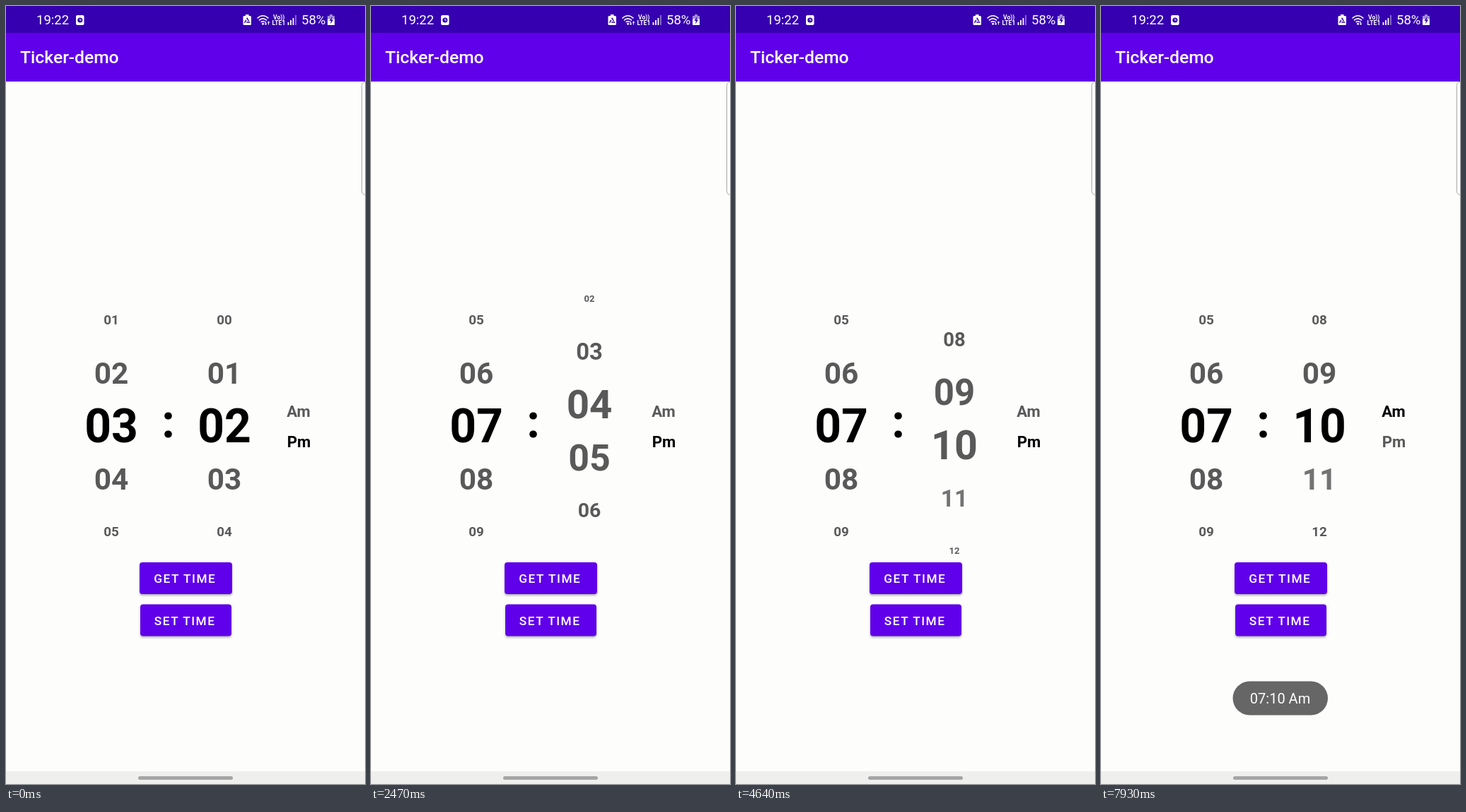
Recreate the animation shown at these times as an HTML page. Size 508 by 1102 pixels, loop 8000 ms.

```html
<!DOCTYPE html>
<html lang="en">
<head>
<meta charset="utf-8">
<title>Ticker-demo</title>
<style>
html, body { margin: 0; width: 100%; height: 100%; overflow: hidden; background: #fdfdfc; }
svg { display: block; width: 508px; height: 1102px; font-family: Roboto, sans-serif; }
.mid { text-anchor: middle; }
.bold { font-weight: 700; }
.label { font-size: 17.3px; font-weight: 500; letter-spacing: .0893em; fill: #fff; }
.status { font-size: 18.5px; fill: #fff; }
.tiny { font-size: 8.6px; font-weight: 700; fill: #fff; }
.btn { fill: #6000ea; }
.shade { filter: drop-shadow(0 2px 1.5px rgba(0, 0, 0, .3)); }
</style>
</head>
<body>
<svg viewBox="0 0 508 1102">
  <defs>
    <clipPath id="wheel"><rect x="60" y="408" width="330" height="374"/></clipPath>
    <clipPath id="face"><rect x="189" y="788" width="131" height="45" rx="4"/></clipPath>
  </defs>
  <rect width="508" height="1102" fill="#fdfdfc"/>
  <rect x="503.5" y="107.5" width="12" height="160" rx="5" fill="#fff" stroke="#a5a5a5"/>
  <rect y="38" width="508" height="69" fill="#6000ea"/>
  <rect width="508" height="38" fill="#3600b0"/>
  <rect y="1084" width="508" height="18" fill="#efefee"/>
  <rect x="187" y="1091" width="134" height="5" rx="2.5" fill="#a5a5a5"/>
  <text x="20" y="81" font-size="24.7" font-weight="500" fill="#fff">Ticker-demo</text>

  <!-- status bar -->
  <text class="status" x="43" y="26">19:22</text>
  <text class="status" x="418" y="26">58%</text>
  <rect x="99" y="13" width="11.5" height="14" rx="2" fill="#fff"/>
  <circle cx="104.8" cy="20" r="3.6" fill="#3600b0"/>
  <path d="M104.8 18v2.2h2" fill="none" stroke="#fff"/>
  <path d="M339 12h4.500v2h2q1.500 0 1.500 1.500v10q0 1.500 -1.500 1.500h-8.500q-1.500 0 -1.500 -1.500v-10q0 -1.500 1.500 -1.500h2z" fill="#fff"/>
  <path d="M341.200 17.500l3.200 5.500h-6.400z" fill="none" stroke="#3600b0" stroke-width="1.500" stroke-dasharray="4.500 1.500"/>
  <g fill="none" stroke="#fff" stroke-width="1.6">
    <path d="M355.500 17.500q8 -7.500 16 0M358 20.300q5.500 -5 11 0M360.600 23q2.900 -2.500 5.800 0"/>
  </g>
  <circle cx="363.500" cy="25.300" r="1.500" fill="#fff"/>
  <path d="M367.500 22v4.500m-1.700 -1.700l1.700 1.700l1.700 -1.700" fill="none" stroke="#fff"/>
  <path id="upload" d="M371.500 26.500v-4.500m-1.700 1.700l1.700 -1.700l1.700 1.700" fill="none" stroke="#fff"/>
  <text class="tiny" x="378" y="18.500">Vo))</text>
  <text class="tiny" x="376.500" y="27">LTE1</text>
  <path d="M399.500 27v-4M403 27v-7M406.500 27v-10" stroke="#fff" stroke-width="1.800"/>
  <path d="M410 27v-14" stroke="#fff" stroke-width="1.600" opacity=".5"/>
  <path d="M458 12h4v2h3v13h-10v-13h3z" fill="#fff" opacity=".55"/>
  <path d="M455 18.500h10v8.500h-10z" fill="#fff"/>
  <path d="M461.500 15l-4 6h2.400l-.800 4.500l4 -6h-2.400z" fill="#3600b0"/>

  <!-- picker -->
  <g id="wheels" class="mid bold" clip-path="url(#wheel)"></g>
  <text class="mid bold" x="229.5" y="610.5" font-size="66">:</text>
  <text id="am" class="mid bold" x="414" y="582.3" font-size="22.2">Am</text>
  <text id="pm" class="mid bold" x="414.5" y="624.7" font-size="22.2">Pm</text>

  <rect id="lift" class="btn shade" x="189" y="788" width="131" height="45" rx="4"/>
  <g clip-path="url(#face)"><circle id="ripple" cx="254" cy="810" fill="#fff"/></g>
  <text class="label" x="209.300" y="817">GET TIME</text>
  <rect class="btn shade" x="190" y="847.5" width="129" height="45" rx="4"/>
  <text class="label" x="209.800" y="876.600">SET TIME</text>

  <g id="toast">
    <rect x="186.500" y="956.500" width="134.500" height="48" rx="24" fill="#666"/>
    <text class="mid" x="253.500" y="988" font-size="20" fill="#fff">07:10 Am</text>
  </g>
</svg>
<script>
const LOOP = 8000, ROW = 75, MIDDLE = 594.5, GREY = '#595959';
const $ = id => document.getElementById(id);
const clamp = (v, lo = 0, hi = 1) => Math.min(hi, Math.max(lo, v));
const ramp = (t, from, to) => clamp((t - from) / (to - from));

// Keys: time in ms, wheel position in rows, speed in rows per ms.
// A repeated time marks a sudden change of speed.
const hours = [
  [0, 3, 0], [635, 3, 0], [635, 3, .004], [1010, 5.33, .006], [1450, 7.4, 0],
  [1450, 7.4, -.0026], [1760, 7, 0], [LOOP, 7, 0]
];
const minutes = [
  [0, 2, 0], [1985, 2, 0], [1985, 2, .004], [2810, 5.9, .0033], [3110, 6.62, .0007],
  [3220, 6.66, 0], [3220, 6.66, .003], [3440, 7, 0], [4195, 7, 0], [4195, 7, .005],
  [4640, 9.63, .005], [4940, 10.38, 0], [5165, 10.38, 0], [5165, 10.38, -.0034],
  [5390, 10, 0], [LOOP, 10, 0]
];

function position(keys, t) {
  let i = 0;
  while (i < keys.length - 2 && keys[i + 1][0] <= t) i++;
  const [t0, p0, v0] = keys[i], [t1, p1, v1] = keys[i + 1];
  const d = t1 - t0, u = (t - t0) / d, w = 1 - u;
  return w * w * ((1 + 2 * u) * p0 + u * d * v0) + u * u * ((3 - 2 * u) * p1 - w * d * v1);
}

function makeWheel(x, keys, tint) {
  const rows = [-2, -1, 0, 1, 2].map(step => {
    const node = document.createElementNS('http://www.w3.org/2000/svg', 'text');
    node.setAttribute('x', x);
    $('wheels').append(node);
    return { node, step };
  });
  return t => {
    const pos = position(keys, t);
    for (const { node, step } of rows) {
      const value = Math.round(pos) + step, offset = value - pos;
      const size = Math.max(13, 66 - 23.6 * Math.abs(offset));
      node.textContent = String(value).padStart(2, '0');
      node.setAttribute('font-size', size);
      node.setAttribute('y', MIDDLE + offset * ROW + size * .3555);
      node.setAttribute('fill', Math.abs(offset) < .015 ? '#000' : tint(value));
    }
  };
}

const wheels = [
  makeWheel(149, hours, () => GREY),
  makeWheel(309, minutes, value => value === 11 ? '#737373' : GREY)
];

function draw(t) {
  wheels.forEach(turn => turn(t));
  const morning = t >= 6060;
  $('am').setAttribute('fill', morning ? '#000' : GREY);
  $('pm').setAttribute('fill', morning ? GREY : '#000');
  $('upload').setAttribute('opacity', t < 6140 ? 1 : 0);

  const press = ramp(t, 7190, 7300) * (1 - ramp(t, 7380, 7600));
  $('lift').style.filter =
    `drop-shadow(0 ${2 + 2 * press}px ${1.5 + 2.5 * press}px rgba(0, 0, 0, .3))`;
  $('ripple').setAttribute('r', 72 * ramp(t, 7190, 7420));
  $('ripple').setAttribute('opacity', .24 * press);
  $('toast').setAttribute('opacity', ramp(t, 7400, 7900));
}

function tick() {
  draw(performance.now() % LOOP);
  requestAnimationFrame(tick);
}
tick();
</script>
</body>
</html>
```
